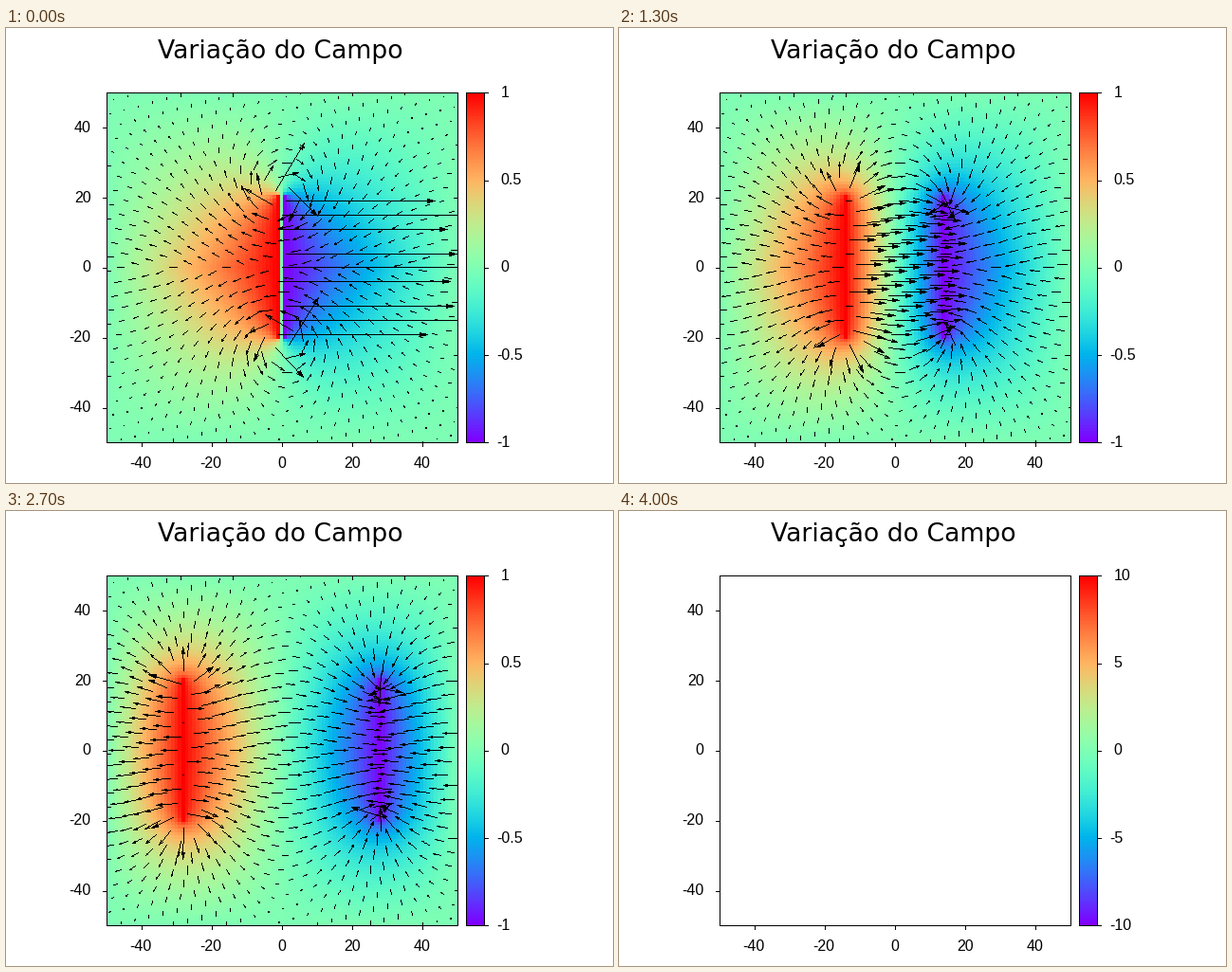
A matplotlib script that plays this animation: 640 by 480 pixels, repeating every 4.2 s.

```python
import numpy as np
import matplotlib.pyplot as plt
from matplotlib.animation import FuncAnimation
from matplotlib.patches import Rectangle

STEPS, BLANK = 40, 2          # plate positions, then empty frames
HALF, PLATE = 50, 20          # half side of the box, half length of a plate
WIDTH, HEIGHT = 640, 480
LEFT, RIGHT, TOP, BOTTOM = 106, 476, 68, 437
PX = 0.72                     # points per pixel at 100 dpi
SCALE = 100                   # arrow length per unit of field


def px(x):
    return LEFT + (x + HALF) * (RIGHT - LEFT) / (2 * HALF)


def py(y):
    return BOTTOM - (y + HALF) * (BOTTOM - TOP) / (2 * HALF)


def solve_quadrants():
    """Relax one quadrant [y, x] for all plate positions at once."""
    n = HALF + 1
    y, x = np.mgrid[:n, :n]
    d = np.arange(1, STEPS + 1)[:, None, None]
    # the middle row keeps this linear fall on both sides of the plate
    u = np.minimum(x / d, (HALF - x) / (HALF - d)) * (1 - y / HALF)
    plate = (x == d) & (y <= PLATE)
    u[plate] = 1
    free = (x > 0) & (x < HALF) & (y > 0) & (y < HALF) & ~plate
    gain = [1.88 / 4 * (free & ((x + y) % 2 == c))[:, 1:-1, 1:-1] for c in (0, 1)]
    mid = u[:, 1:-1, 1:-1]
    for _ in range(220):
        for g in gain:
            mid += g * (u[:, 2:, 1:-1] + u[:, :-2, 1:-1]
                        + u[:, 1:-1, 2:] + u[:, 1:-1, :-2] - 4 * mid)
    return u


def unfold(q):
    right = np.concatenate([q[:0:-1], q])
    return np.concatenate([right[:, :0:-1], -right], axis=1)


def stroke(mask, a, b):
    """Hard-edged line, one pixel wide, kept inside the plot box."""
    n = int(max(abs(b - a))) + 1
    x, y = np.rint(np.linspace(a, b, n)).astype(int).T
    keep = (x >= LEFT) & (x <= RIGHT) & (y >= TOP) & (y <= BOTTOM)
    mask[y[keep], x[keep]] = 255


def head(mask, a, b):
    size = np.hypot(*(b - a))
    back = (a - b) / size * np.clip(0.3 * size, 1.2, 8)
    wing = np.array([-back[1], back[0]]) * np.tan(np.radians(15))
    p, q = b + np.trunc(back + wing), b + np.trunc(back - wing)
    for corner in np.linspace(p, q, 2 * int(max(abs(q - p))) + 1):
        stroke(mask, corner, b)


def arrows(v):
    """Opacity of the arrows at every 15th grid point, column by column."""
    mask = np.zeros((HEIGHT, WIDTH), np.uint8)
    gy, gx = np.gradient(v)
    side = 2 * HALF + 1
    col, row = np.divmod(np.arange(0, side * side, 15), side)
    x, y = col - HALF, row - HALF
    start = np.rint(np.column_stack([px(x), py(y)]))
    end = np.rint(np.column_stack([px(x - SCALE * gx[row, col]),
                                   py(y - SCALE * gy[row, col])]))
    for a, b in zip(start, end):
        stroke(mask, a, b)
        inside = LEFT <= b[0] <= RIGHT and TOP <= b[1] <= BOTTOM
        if inside and any(a != b):
            head(mask, a, b)
    return mask


fields = [unfold(q) for q in solve_quadrants()]

fig = plt.figure(figsize=(6.4, 4.8), dpi=100, facecolor="white")
ax = fig.add_axes([0, 0, 1, 1])
ax.axis("off")

edges = np.array([px(-50.5), px(50.5), py(-50.5), py(50.5)]) - 0.5
field = ax.imshow(fields[0], cmap="rainbow", vmin=-1, vmax=1, origin="lower",
                  interpolation="nearest", aspect="auto", extent=edges, zorder=1)
ax.imshow(np.linspace(0, 1, 256)[:, None], cmap="rainbow", origin="lower",
          aspect="auto", extent=(485, 504, BOTTOM, TOP), zorder=1)
# whole numbers fall just short of pixel centres, so lines snap to them
ax.set_xlim(-0.4, WIDTH - 0.4)
ax.set_ylim(HEIGHT - 0.4, -0.4)

area = Rectangle((LEFT, TOP), RIGHT - LEFT, BOTTOM - TOP, fc="none", ec="none")
ax.add_patch(area)
field.set_clip_path(area)

ink = np.zeros((HEIGHT, WIDTH, 4), np.uint8)
overlay = fig.figimage(ink, 0, 0, origin="upper", zorder=3)


def line(xs, ys):
    ax.plot(xs, ys, color="k", lw=PX, zorder=4, snap=True)


def label(x, y, text, ha):
    return ax.text(x, y, text, ha=ha, va="center_baseline",
                   family="Liberation Sans", fontsize=16 * PX)


for x0, x1 in ((LEFT, RIGHT), (485, 504)):
    line([x0, x1, x1, x0, x0], [TOP, TOP, BOTTOM, BOTTOM, TOP])
for t in range(-40, 41, 20):
    line([px(t)] * 2, [BOTTOM, BOTTOM + 4])
    line([LEFT - 4, LEFT], [py(t)] * 2)
    label(px(t) - (2 if t < 0 else 0.5), 458, str(t), "center")
    label(89, py(t) - 1.5, str(t), "right")

levels = np.linspace(-1, 1, 5)
bar_labels = []
for t in levels:
    y = py(t * HALF)
    line([504, 508], [y, y])
    bar_labels.append(label(517 if t < 0 else 521, y - 1.5, "", "left"))

ax.text(288.5, 32, "Variação do Campo", ha="center", va="baseline",
        family="DejaVu Sans", fontsize=26.67 * PX)


def draw(i):
    shown = i < STEPS
    field.set_visible(shown)
    overlay.set_visible(shown)
    for text, t in zip(bar_labels, levels):
        text.set_text(f"{t if shown else 10 * t:g}")
    if shown:
        field.set_data(fields[i])
        ink[..., 3] = arrows(fields[i])
        overlay.set_data(ink)
    return field, overlay, *bar_labels


anim = FuncAnimation(fig, draw, frames=STEPS + BLANK, interval=100,
                     repeat=True, repeat_delay=0, blit=False)
plt.show()
```
